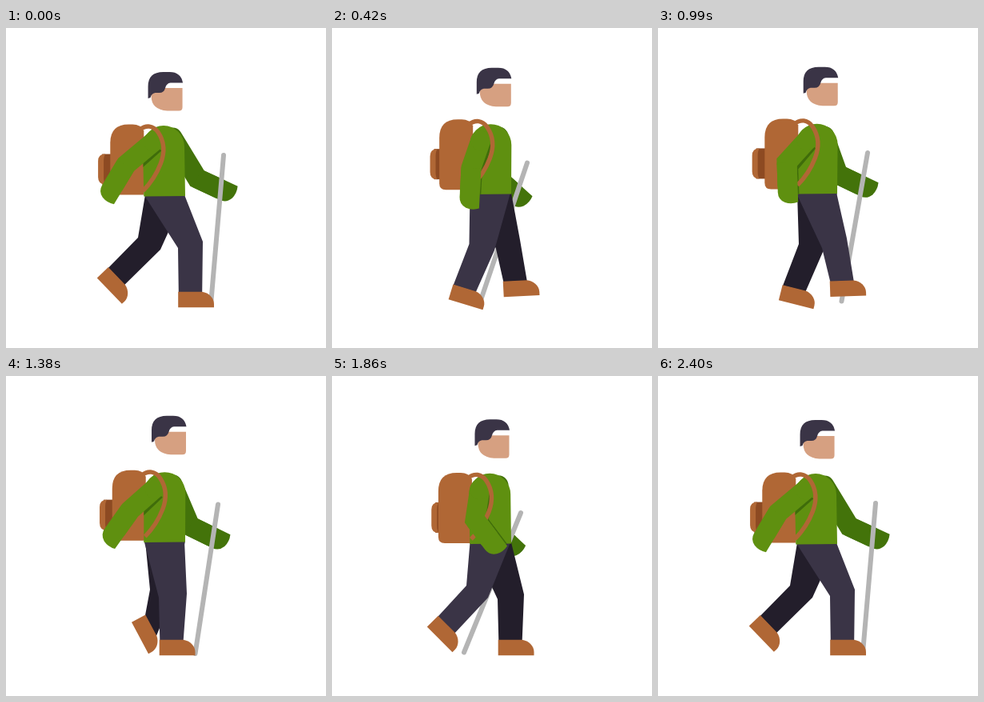
An HTML page that plays this animation: 400x400 px, repeating every 2.43 s.

```html
<!DOCTYPE html>
<html lang="en">
<head>
<meta charset="utf-8">
<title>Hiker</title>
<style>
  html, body { margin: 0; width: 100%; height: 100%; overflow: hidden; background: #fff; }
  svg { display: block; width: 100vw; height: 100vh; }
</style>
</head>
<body>
<svg viewBox="0 0 400 400">
  <defs>
    <path id="shoe" d="M-15.3 0H14.5C23 1 29.5 8 29.5 15V19.6H-15.3Z"/>
    <path id="forearm" d="M-12.5 0V37Q-12.5 46 -4 50Q4 53 12.5 50V0Z"/>
    <clipPath id="torsoClip"><path id="torsoEdge"/></clipPath>
  </defs>

  <g fill="#43730a" stroke="none">
    <path id="farArm" fill="none" stroke="#43730a" stroke-width="25" stroke-linecap="round"/>
    <use id="farHand" href="#forearm"/>
  </g>
  <path id="stick" stroke="#b4b4b4" stroke-width="6" stroke-linecap="round"/>

  <path id="farLeg" fill="#231e2b"/>
  <use id="farShoe" href="#shoe" fill="#b06735"/>
  <path id="nearLeg" fill="#3a3446"/>
  <use id="nearShoe" href="#shoe" fill="#b06735"/>

  <path id="pocketSide" fill="#8d4a22"/>
  <path id="pocket" fill="#b06735"/>
  <path id="pack" fill="#b06735" d="M0 23Q0 0 23 0H28Q38 0 42 8V88H8Q0 88 0 80Z"/>

  <path id="torso" fill="#5f9010"/>
  <path id="fold" clip-path="url(#torsoClip)" fill="none" stroke="#3f6c0a" stroke-width="4"/>
  <path id="nearArm" fill="none" stroke="#5f9010" stroke-width="25" stroke-linejoin="miter"/>
  <circle id="shoulder" r="12.5" fill="#5f9010"/>
  <path id="strap" fill="none" stroke="#b06735" stroke-width="5.4"
    d="M36 7C45 0 54 1 60 10C68 22 68 36 63 49C58 62 51 73 41 83"/>
  <use id="nearHand" href="#forearm" fill="#5f9010"/>

  <g id="head">
    <path fill="#d6a081" d="M4 20H43V44Q43 48.500 38.500 48.500H24Q4 47 4 30Z"/>
    <path fill="#3a3446" d="M0 33V18Q0 0 19 0H27Q41 0 43.500 13.500H28Q23 14 21.500 20Q20 26 14 26H9Q4 27 3 32Z"/>
  </g>
</svg>

<script>
const STEP = 30, LOOP = 2430, CYCLE = 1200;
const el = id => document.getElementById(id);

// time, knee back x y, knee front x y, ankle x y, shoe angle
const LEG = [
  [0, 215, 275, 246, 267, 230.5, 329.7, 0],
  [60, 207, 279, 240, 273, 223, 329.7, 0],
  [180, 191, 277, 226, 272, 207, 329.7, 0],
  [390, 176, 270, 206, 280, 170.5, 325, 14],
  [420, 171.5, 270, 203, 278, 166, 325, 17],
  [600, 165, 262, 193, 277, 138.5, 310, 46],
  [660, 168, 262, 195, 277, 143.5, 310.5, 45],
  [780, 180, 267, 210, 272, 181.5, 312, 62],
  [990, 205, 275, 236, 263, 230, 316, -2],
  [1020, 205, 276, 235, 265, 229, 316, -3]
];
// time, elbow x y, forearm angle
const NEAR_ARM = [
  [0, 150, 171, 31], [180, 155, 168, 35.5], [420, 174, 175, 3],
  [660, 179, 180, -37], [990, 161, 168, -2]
];
const FAR_ARM = [
  [0, 239, 188, -65], [180, 230, 187.5, -64], [420, 205, 186, -48],
  [660, 197, 187, -47], [990, 225, 183, -64.5]
];
// time, top x y, tip x y
const STICK = [
  [0, 272, 159, 256, 346], [180, 265, 160.5, 236.5, 347], [420, 244, 168.5, 184, 346],
  [660, 236, 171, 165, 345.5], [990, 262, 156, 229.5, 341.5]
];

// Smooth periodic curve through rows of keys
function pose(keys, time) {
  const n = keys.length, p = (time % CYCLE + CYCLE) % CYCLE;
  const at = i => keys[(i + n) % n];
  const when = i => at(i)[0] + CYCLE * Math.floor(i / n);
  let i = n - 1;
  while (keys[i][0] > p) i--;
  const h = when(i + 1) - when(i), u = (p - when(i)) / h;
  return at(i).slice(1).map((_, c) => {
    const v = k => at(k)[c + 1];
    const slope = k => (v(k + 1) - v(k)) / (when(k + 1) - when(k));
    const tangent = k => {
      const a = when(k) - when(k - 1), b = when(k + 1) - when(k);
      return (slope(k - 1) * b + slope(k) * a) / (a + b);
    };
    const w = u - 1;
    return v(i) * (1 + 2 * u) * w * w + v(i + 1) * u * u * (3 - 2 * u)
      + h * (tangent(i) * u * w * w + tangent(i + 1) * u * u * w);
  });
}

const wave = (t, period, shift = 0) => Math.cos(2 * Math.PI * (t + shift) / period);
const line = pts => 'M' + pts.map(p => p.map(n => n.toFixed(2)).join(' ')).join('L');
const draw = (id, d) => el(id).setAttribute('d', d);
const place = (id, x, y, a = 0) =>
  el(id).setAttribute('transform', `translate(${x.toFixed(2)} ${y.toFixed(2)}) rotate(${a.toFixed(2)})`);

// Point at local (x, y) in a frame at (ox, oy) turned by a degrees
function local(ox, oy, a, x, y) {
  const r = a * Math.PI / 180, c = Math.cos(r), s = Math.sin(r);
  return [ox + x * c - y * s, oy + x * s + y * c];
}

function leg(name, time, left, right, hip) {
  const [bx, by, fx, fy, ax, y, a] = pose(LEG, time);
  const ay = Math.min(y, 329.7);
  draw(name + 'Leg', line([
    [left, hip], [right, hip], [fx, fy],
    local(ax, ay, a, 14.7, 0.7), local(ax, ay, a, -14.7, 0.7), [bx, by]
  ]) + 'Z');
  place(name + 'Shoe', ax, ay, a);
}

function arm(name, keys, time, sx, sy) {
  const [ex, ey, a] = pose(keys, time);
  draw(name + 'Arm', line([[sx, sy], [ex, ey], local(ex, ey, a, 0, 30)]));
  place(name + 'Hand', ex, ey, a);
  return [ex, ey, a];
}

function render(t) {
  const bob = wave(t, 600), swing = wave(t, CYCLE);

  place('head', 180.5 - 3 * wave(t, 600, 20), 51 + 4 * bob);

  const hem = 208.6 + 1.8 * bob, top = 120.6 + 1.5 * bob, lean = -bob;
  const shirt = `M172.3 ${hem}L${172 + lean} ${top + 26}a26 26 0 0 1 52 0L224 ${hem - 0.5}Z`;
  draw('torso', shirt);
  draw('torsoEdge', shirt);

  leg('far', t + 600, 174, 224, hem - 2);
  leg('near', t, 172.5, 223, hem - 2);

  arm('far', FAR_ARM, t, 208, 136 + bob);
  const [tx, ty, bx, by] = pose(STICK, t);
  draw('stick', line([[tx, ty], [bx, by]]));

  const sx = 185.5 - bob, sy = 141 + bob;
  const [ex, ey, a] = arm('near', NEAR_ARM, t, sx, sy);
  place('shoulder', sx, sy);
  // Shade along the inner edge of the arm
  const len = Math.hypot(ex - sx, ey - sy);
  const ox = (ey - sy) / len * 13, oy = (sx - ex) / len * 13;
  draw('fold', line([
    [sx + ox, sy + oy], [ex + ox + 1, ey + oy + 1],
    local(ex, ey, a, 12, 6), local(ex, ey, a, 12, 49)
  ]));

  const px = 133 - 1.5 * bob - 1.2 * swing, py = 117 + 4 * wave(t, 600, -45);
  place('pack', px, py);
  place('strap', px, py);
  const kx = 119.8 - 4.7 * swing, ky = py + 37;
  draw('pocketSide', `M${kx + 5} ${ky}H${px + 6}v38H${kx + 5}Z`);
  draw('pocket', `M${kx + 9} ${ky}q-9 0 -9 9v20q0 9 9 9q-2 -3 -2 -9v-20q0 -6 2 -9Z`);
}

const start = performance.now();
function tick() {
  const t = (performance.now() - start) % LOOP;
  render(Math.floor(t / STEP) * STEP);
  requestAnimationFrame(tick);
}
tick();
</script>
</body>
</html>
```
